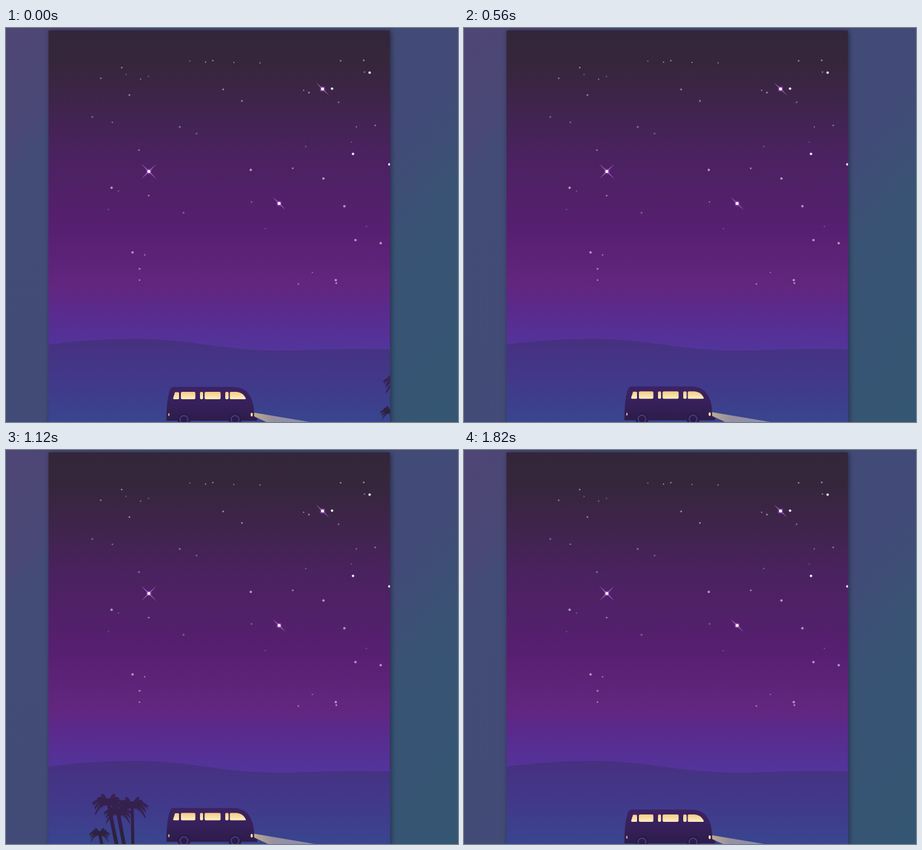
Write an HTML page with a canvas that moves like this. It is 734x640 px and loops after 1890 ms.

```html
<!DOCTYPE html>
<html lang="en">
<head>
<meta charset="utf-8">
<title>Night drive</title>
<style>
html, body { margin: 0; height: 100%; overflow: hidden; background: #434a76; }
canvas { display: block; }
</style>
</head>
<body>
<canvas id="stage" width="734" height="640"></canvas>
<script>
const c = document.getElementById('stage').getContext('2d');
const { PI, sin, cos } = Math;
const STEP = 70, STEPS = 27;
const SPEED = 160, SPAN = 720; // palms: pixels per step, distance between passes

// evenly spaced colours unless a stop gives its own place
function gradient(x0, y0, x1, y1, ...stops) {
  const g = c.createLinearGradient(x0, y0, x1, y1);
  stops.forEach((stop, i) => {
    const [color, at = i / (stops.length - 1)] = [].concat(stop);
    g.addColorStop(at, color);
  });
  return g;
}
const vertical = (y0, y1, ...stops) => gradient(0, y0, 0, y1, ...stops);

function fill(path, style) {
  c.fillStyle = style;
  c.fill(new Path2D(path));
}
function disc(x, y, r, style, ry = r) {
  c.fillStyle = style;
  c.beginPath();
  c.ellipse(x, y, r, ry, 0, 0, 7);
  c.fill();
}
function randomizer(seed) {
  return () => (seed = seed * 16807 % 2147483647) / 2147483647;
}

const backdrop = gradient(0, 0, 734, 640, '#4f4675', ['#4a4876', .13], ['#424c76', .18],
  ['#424b77', .62], ['#395374', .74], '#345673');
const sky = vertical(4, 524, '#33263a', ['#36263c', .11], ['#4a225f', .38],
  ['#571f70', .62], ['#62267f', .8], ['#5a2a8c', .87], '#52359c');
const hill = vertical(504, 640, '#47307f', '#42388a', '#39458f');
const leaf = vertical(556, 640, '#37214f', '#32204a', '#292235');
const paint = vertical(581, 637, '#3d2263', '#36205a', '#2d1c4a');
const glass = vertical(589, 602, '#f3cc85', '#fff1c6');
const light = gradient(402, 0, 505, 0, 'rgba(236,206,140,.75)',
  ['rgba(212,196,172,.6)', .3], 'rgba(205,200,205,.55)');

function sparkle(x, y, size, cross) {
  c.save();
  c.translate(x, y);
  disc(0, 0, 4.5, 'rgba(175,80,210,.35)');
  for (const [turn, len] of [[1, size], [3, cross]]) {
    c.save();
    c.rotate(turn * PI / 4);
    fill(`M${-len} 0L0 -1.1L${len} 0L0 1.1Z`, '#a85bcb');
    c.restore();
  }
  disc(0, 0, 2.5, '#fff');
  c.restore();
}

function stars() {
  const random = randomizer(41);
  for (let i = 0; i < 42; i++) {
    const x = 140 + 470 * random(), y = 52 + 375 * random() ** 1.5;
    const color = i % 7 ? 'rgba(200,175,215,' : 'rgba(110,130,190,';
    disc(x, y, 1 + .6 * random(), color + (.4 + .35 * random()) + ')');
  }
  const bright = [[590, 72], [529, 98], [563, 204], [622, 221]];
  const soft = [[171, 259], [205, 364], [397, 230], [515, 244],
    [549, 289], [567, 344], [608, 349], [535, 409]];
  for (const [x, y] of bright) disc(x + .5, y + .5, 2, '#f4effa');
  for (const [x, y] of soft) disc(x + .5, y + .5, 2, '#b294bf');
  sparkle(232, 233, 18, 17);
  sparkle(514, 99, 15, 6);
  sparkle(443.5, 285, 15, 5);
}

function panel() {
  c.save();
  c.shadowColor = 'rgba(22,24,48,.75)';
  c.shadowBlur = 9;
  c.shadowOffsetX = 1.5;
  c.shadowOffsetY = 1;
  c.fillStyle = sky;
  c.fillRect(69, 4, 554.5, 660);
  c.restore();
}

// one drooping leaf with a ragged underside
function frond(x, y, dx, dy, size) {
  const lift = size * .4;
  c.beginPath();
  c.moveTo(x, y);
  c.quadraticCurveTo(x + dx * .65, y + dy * .5 - lift, x + dx, y + dy);
  for (let k = .85; k > .1; k -= .17) {
    const bend = 2 * k * (1 - k);
    const px = x + (bend * .65 + k * k) * dx;
    const py = y + bend * (dy * .5 - lift) + k * k * dy;
    c.lineTo(px, py + size * .12);
    c.lineTo(px + dx * .05, py + size * .3);
  }
  c.fill();
}

function palm(x, y, size, foot, width) {
  c.strokeStyle = leaf;
  c.lineWidth = width;
  c.beginPath();
  c.moveTo(x, y);
  c.quadraticCurveTo(x + (foot - x) * .4, y + (642 - y) * .45, foot, 642);
  c.stroke();
  disc(x, y + 1, size * .22, leaf);
  const count = 11;
  for (let i = 0; i < count; i++) {
    const angle = PI * (1.4 * i / (count - 1) - 1.2);
    const reach = size * (i % 2 ? .86 : 1);
    frond(x, y, cos(angle) * reach, (sin(angle) * .8 + .33) * reach, size);
  }
}

function palms(left) {
  c.save();
  c.translate(left - 463, 0);
  palm(494, 571, 28, 508, 6);
  palm(533, 576, 28, 534, 5);
  palm(510, 587, 25, 520, 6);
  palm(480, 622, 18, 484, 5);
  c.restore();
}

function wheel(x) {
  disc(x, 634, 10.5, '#2b1b49');
  c.strokeStyle = '#443f82';
  c.lineWidth = 1.7;
  c.beginPath();
  c.arc(x, 634, 6.3, 0, 7);
  c.stroke();
}

function van(drop) {
  c.save();
  c.translate(0, drop);
  fill('M401 622.5L505 640L540 646H440L401 628Z', light);
  fill('M260.5 636C260.5 615 262 598 266 586Q267.5 581 273 581H366C384 581 392 587 397 597'
    + 'C402 607 403 616 403 629L408 632V636Z', paint);
  fill('M274.5 589.5H279.5Q281 589.5 281 591V599.5Q281 601 279.5 601H273Q271 601 271.5 599Z', glass);
  for (const [x, w] of [[284, 23.5], [315, 5], [322.5, 26], [356, 5.5]]) {
    c.beginPath();
    c.roundRect(x, 589, w, 12, 2);
    c.fill();
  }
  fill('M365 589H373C382 589 387 594 389.5 600Q389.5 601 388 601H365.5Q363.5 601 363.5 600V591Q363.5 589 365 589Z', glass);
  disc(399, 626, 1.7, '#ffe9ad', 3);
  disc(264.5, 626, 1, '#e8c9b4', 2.5);
  wheel(289);
  wheel(372);
  c.restore();
}

function draw(now) {
  const n = Math.floor(now / STEP) % STEPS;
  const turn = 2 * PI * (n - 5) / STEPS;
  // steady pace with a slight sway and a short catch-up after the restart
  const x = 529 - SPEED * n + 15 * cos(2 * turn) + 89 * .2 ** n;
  const left = ((x + 56) % SPAN + SPAN) % SPAN - 56;
  const drop = 1.5 - 1.5 * cos(7 * turn);

  c.fillStyle = backdrop;
  c.fillRect(0, 0, 734, 640);
  panel();
  c.save();
  c.beginPath();
  c.rect(69, 4, 554.5, 636);
  c.clip();
  stars();
  fill('M69 514C120 508 160 505 210 505C300 505 350 524 440 524C500 524 530 520 624 522V640H69Z', hill);
  palms(left);
  van(drop);
  c.restore();
}

const start = performance.now();
(function tick() {
  draw(performance.now() - start);
  requestAnimationFrame(tick);
})();
</script>
</body>
</html>
```
